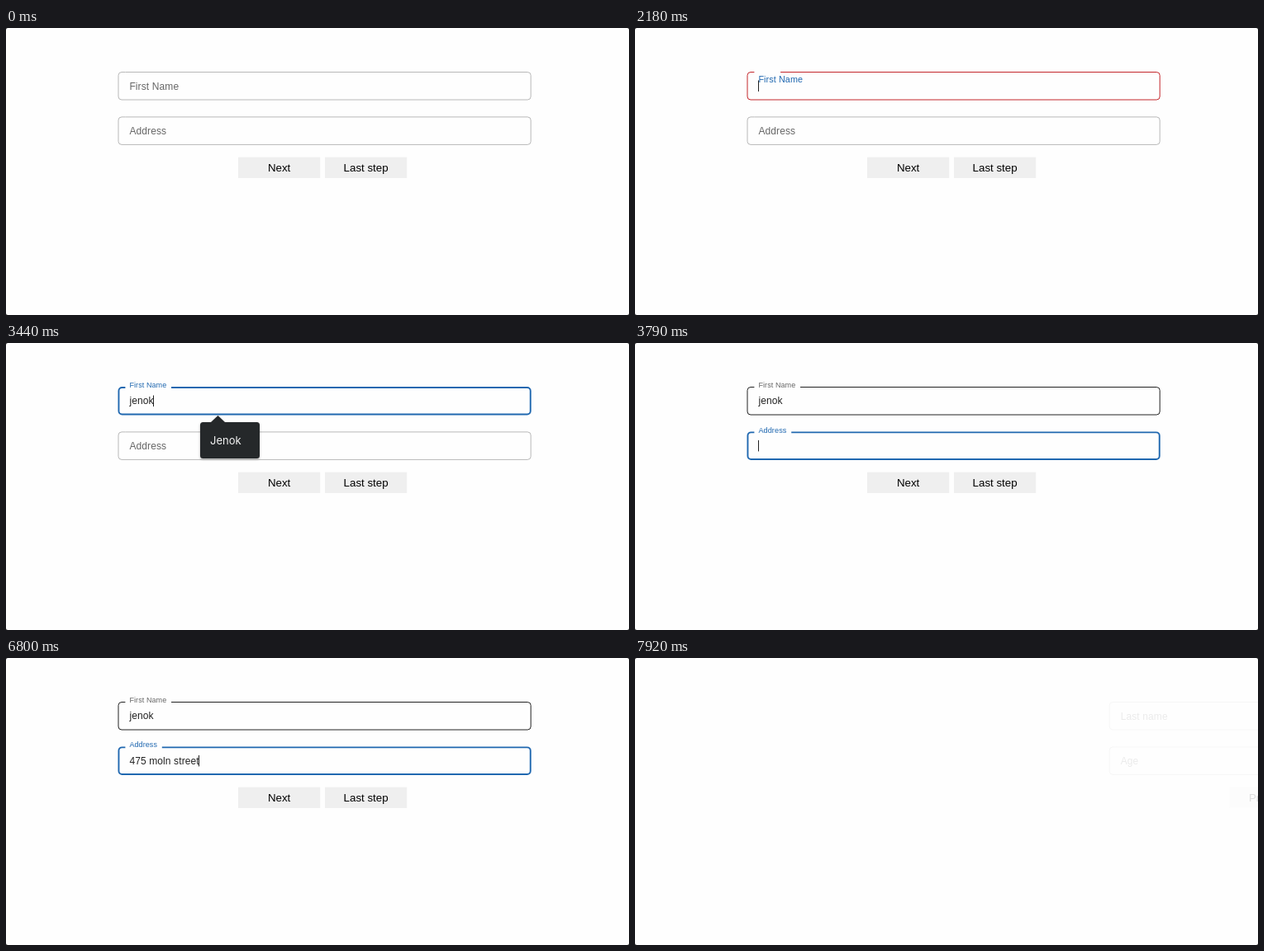
An HTML page with a canvas for the animation above (7.99 s loop, 754x348 px).

```html
<!DOCTYPE html>
<html lang="en">
<head>
<meta charset="utf-8">
<title>Step form</title>
<style>
html, body { margin: 0; width: 100%; height: 100%; overflow: hidden; background: #fefefe; }
canvas { display: block; width: 754px; height: 348px; }
</style>
</head>
<body>
<canvas id="stage" width="754" height="348"></canvas>
<script>
const ctx = document.getElementById('stage').getContext('2d');
const W = 754, H = 348, LOOP = 7990, TICK = 70;
const SANS = '"Liberation Sans", Arial, sans-serif';
const MENU_FONT = '13px Inter, Roboto, sans-serif';
const PAPER = '#fefefe', GREY = '#b8b8b8', DARK = '#222', LABEL = '#666';
const BLUE = '#2068b0', RED = '#c4262b';
const LEFT = 136, RIGHT = 635.2, TEXT_X = 149.4;
const ROW1 = 53.5, ROW2 = 107.9, ROW_H = 33.5;

const NAME = 'jenok';
const NAME_KEYS = [2950, 3090, 3230, 3370, 3440];
const STREET = '475 moln street';
const STREET_KEYS = [4840, 4910, 4980, 5190, 5260, 5400, 5470, 5610, 5680,
  5820, 6170, 6450, 6520, 6660, 6800];
const MENU = ['Jenok', 'Rila', 'Norly', 'T1', 'b', 'f'];

const clamp = v => Math.min(1, Math.max(0, v));
const mix = (a, b, p) => a + (b - a) * p;
const within = (t, a, b) => t >= a && t < b;
const typed = (text, keys, t) => text.slice(0, keys.filter(k => k <= t).length);

function bezier(x1, y1, x2, y2) {
  const at = (a, b, s) => 3 * a * s * (1 - s) ** 2 + 3 * b * s * s * (1 - s) + s ** 3;
  return x => {
    if (x <= 0 || x >= 1) return clamp(x);
    let lo = 0, hi = 1;
    for (let i = 0; i < 24; i++) {
      const mid = (lo + hi) / 2;
      if (at(x1, x2, mid) < x) lo = mid; else hi = mid;
    }
    return at(y1, y2, lo);
  };
}
const easeOut = bezier(0, 0, 0.2, 1);
const ease = bezier(0.25, 0.1, 0.25, 1);

function write(text, x, y, font, color, spacing = 0) {
  ctx.font = font;
  ctx.letterSpacing = spacing + 'px';
  ctx.fillStyle = color;
  ctx.fillText(text, x, y);
  return ctx.measureText(text).width;
}

// Rounded outline whose top edge opens between two x positions.
function outline(top, color, width, gapFrom, gapTo) {
  const inset = (width - 1) / 2, r = 4;
  const l = LEFT + inset, rt = RIGHT - inset, t = top + inset, b = top + ROW_H - inset;
  ctx.beginPath();
  ctx.moveTo(gapTo, t);
  ctx.arcTo(rt, t, rt, b, r);
  ctx.arcTo(rt, b, l, b, r);
  ctx.arcTo(l, b, l, t, r);
  ctx.arcTo(l, t, rt, t, r);
  ctx.lineTo(gapFrom, t);
  ctx.strokeStyle = color;
  ctx.lineWidth = width;
  ctx.stroke();
}

function field(top, f) {
  const lift = f.lift || 0;
  const size = mix(12, 9, lift);
  const labelW = write(f.label, TEXT_X, top + mix(21.3, 0.2, lift),
    size + 'px ' + SANS, f.labelColor || LABEL, size * 0.00938);
  const open = clamp(lift * 1.2);
  const from = TEXT_X - 5;
  outline(top, f.border || GREY, f.thick ? 1.9 : 1, from, from + (labelW + 10.8) * open);
  const textW = f.text ? write(f.text, TEXT_X, top + 20.9, '12px ' + SANS, DARK, 0.11) : 0;
  if (f.caret) {
    ctx.fillStyle = DARK;
    ctx.fillRect(Math.round(TEXT_X + textW - 0.4), top + 10, 1, 13.5);
  }
}

function button(x, text) {
  ctx.fillStyle = '#efefef';
  ctx.fillRect(x, 156.6, 99.2, 25.3);
  ctx.textAlign = 'center';
  write(text, x + 49.6, 173.8, '13.333px ' + SANS, '#000');
  ctx.textAlign = 'left';
}

function menu(items) {
  const h = items.length * 36 + 8;
  ctx.save();
  ctx.shadowColor = 'rgba(0,0,0,.3)';
  ctx.shadowBlur = 3;
  ctx.shadowOffsetY = 1;
  ctx.fillStyle = '#25282a';
  ctx.beginPath();
  ctx.roundRect(235, 96, 72, h, 3.5);
  ctx.moveTo(247.5, 96.5);
  ctx.lineTo(256.5, 88);
  ctx.lineTo(265.5, 96.5);
  ctx.fill();
  ctx.restore();
  items.forEach((item, i) => write(item, 247, 122.8 + i * 36, MENU_FONT, '#f4f4f4'));
}

function panel(shift, alpha, draw) {
  ctx.save();
  ctx.globalAlpha = alpha;
  ctx.translate(shift, 0);
  draw();
  ctx.restore();
}

function firstStep(t) {
  const typing = within(t, 2950, 3650);
  const onName = within(t, 2180, 3650);
  const onStreet = within(t, 3650, 7500);
  let border = GREY;
  if (within(t, 500, 2950)) border = RED;
  else if (typing) border = BLUE;
  else if (within(t, 3650, 7010)) border = DARK;

  field(ROW1, {
    label: 'First Name',
    lift: easeOut((t - 2150) / 200),
    labelColor: onName ? BLUE : LABEL,
    border, thick: typing,
    text: typed(NAME, NAME_KEYS, t),
    caret: onName && !within(t, 2740, 2950)
  });
  field(ROW2, {
    label: 'Address',
    lift: easeOut((t - 3630) / 220),
    labelColor: onStreet ? BLUE : LABEL,
    border: onStreet ? BLUE : within(t, 1690, 1760) ? DARK : GREY,
    thick: onStreet,
    text: typed(STREET, STREET_KEYS, t),
    caret: onStreet && !within(t, 4210, 4770) && t < 7290
  });
  button(281, 'Next');
  button(386, 'Last step');
}

function secondStep() {
  field(ROW1, { label: 'Last name' });
  field(ROW2, { label: 'Age' });
  button(281, 'Previous');
}

function render(t) {
  ctx.fillStyle = '#333';
  ctx.fillRect(0, 0, W, H);
  ctx.fillStyle = PAPER;
  ctx.beginPath();
  ctx.roundRect(0, 0, W, H, 2.5);
  ctx.fill();

  const leave = ease((t - 7473) / 400);
  const enter = ease((t - 7873) / 400);
  if (leave < 1) panel(-500 * leave, 1 - leave, () => firstStep(t));
  else panel(500 * (1 - enter), enter, secondStep);

  if (within(t, 2320, 3650)) menu(t < 2950 ? MENU : MENU.slice(0, 1));
}

const start = performance.now();
function loop() {
  const t = (performance.now() - start) % LOOP;
  render(t < 500 ? 0 : 500 + Math.floor((t - 500) / TICK) * TICK);
  requestAnimationFrame(loop);
}
loop();
</script>
</body>
</html>
```
